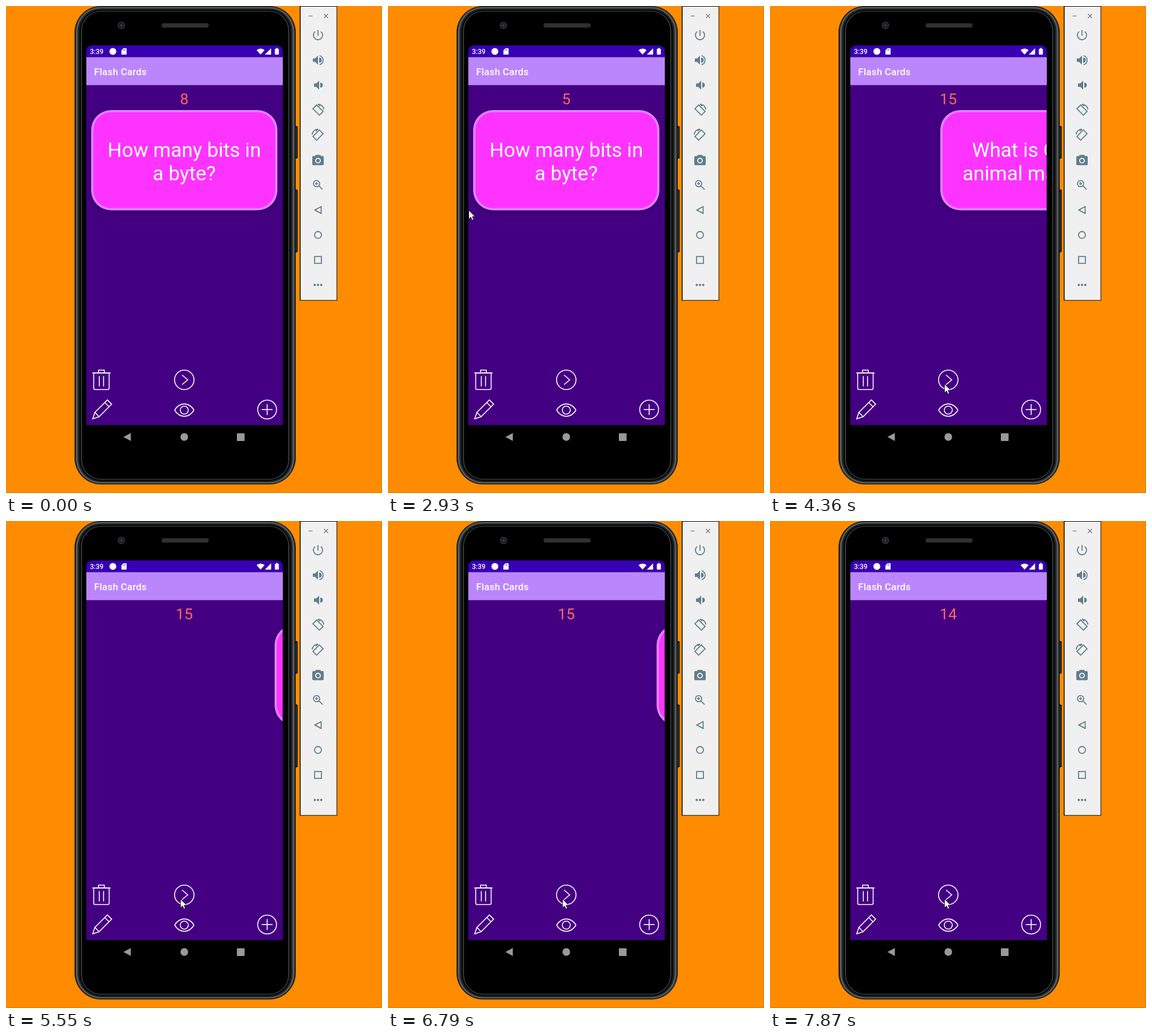
These frames come from a looping animation (658x852 px, 7990 ms). An HTML page with a canvas:

```html
<!DOCTYPE html>
<html lang="en">
<head>
<meta charset="utf-8">
<title>Flash Cards</title>
<style>
html, body { margin: 0; width: 100%; height: 100%; overflow: hidden; background: #ff8c00; }
canvas { display: block; }
</style>
</head>
<body>
<canvas id="stage" width="658" height="852"></canvas>
<script>
const ctx = document.getElementById('stage').getContext('2d');
const TAU = Math.PI * 2;
const LOOP = 7990;
const STEP = 132;
const SLIDE_STEP = 92;  // card travel per refresh

const stepsSince = (t, start) => Math.floor((t - start + 30) / STEP);

const deals = [
  { at: 4090, from: 333, count: 15 },
  { at: 5550, from: 321, count: 15 },
  { at: 6790, from: 321, count: 15 },
  { at: 7870, from: 400, count: 14 }
];
const POINTER_START = 1730;
const pointerPath = [
  { step: 0, x: 536, y: 839 },
  { step: 2, x: 373, y: 717 },
  { step: 6, x: 325, y: 688 },
  { step: 8, x: 451, y: 554 },
  { step: 9, x: 141, y: 357 },
  { step: 10, x: 240, y: 55 },
  { step: 13, x: 270, y: 772 },
  { step: 16, x: 305, y: 661 }
];

function pointerAt(t) {
  const step = stepsSince(t, POINTER_START);
  const next = pointerPath.findIndex(p => p.step > step);
  if (next < 0) return pointerPath.at(-1);
  const a = pointerPath[next - 1], b = pointerPath[next];
  const k = (step - a.step) / (b.step - a.step);
  return { x: a.x + (b.x - a.x) * k, y: a.y + (b.y - a.y) * k };
}

function stateAt(t) {
  const deal = deals.findLast(d => d.at <= t);
  if (!deal) {
    return { count: 8 - Math.floor((t + 573) / 1003), offset: 0, lines: ['How many bits in', 'a byte?'] };
  }
  return {
    count: deal.count - Math.floor((t - deal.at) / 920),
    offset: Math.max(0, deal.from - SLIDE_STEP * stepsSince(t, deal.at)),
    lines: ["What is OSU's", 'animal mascot?']
  };
}

function box(x, y, w, h, r, color) {
  ctx.beginPath();
  ctx.roundRect(x, y, w, h, r);
  ctx.fillStyle = color;
  ctx.fill();
}

function disc(x, y, r, color = ctx.fillStyle) {
  ctx.beginPath();
  ctx.arc(x, y, r, 0, TAU);
  ctx.fillStyle = color;
  ctx.fill();
}

function arc(x, y, r, from = 0, to = TAU) {
  ctx.beginPath();
  ctx.arc(x, y, r, from, to);
  ctx.stroke();
}

function trace(xy) {
  ctx.beginPath();
  for (let i = 0; i < xy.length; i += 2) ctx.lineTo(xy[i], xy[i + 1]);
}

function line(...xy) {
  trace(xy);
  ctx.stroke();
}

function outline(...xy) {
  trace(xy);
  ctx.closePath();
  ctx.stroke();
}

function solid(...xy) {
  trace(xy);
  ctx.fill();
}

function icon(x, y, color, width, paint) {
  ctx.save();
  ctx.translate(x, y);
  ctx.fillStyle = ctx.strokeStyle = color;
  ctx.lineWidth = width;
  paint();
  ctx.restore();
}

function text(str, x, y, font, color, align = 'left', spacing = 0) {
  ctx.font = font + ' Roboto, sans-serif';
  ctx.textAlign = align;
  ctx.letterSpacing = spacing + 'px';
  ctx.fillStyle = color;
  ctx.fillText(str, x, y);
}

function drawPhone() {
  for (const [y, h] of [[210, 57], [321, 110]]) {
    box(504, y, 6.5, h, 2, '#151515');
    box(507, y + 3, 1.5, h - 6, 0, '#3b3b3b');
  }

  // Metal rim, from the outer edge inwards.
  const rim = [[0, '#131516'], [2, '#54595c'], [5.5, '#202324'], [8.5, '#070808'], [11.5, '#43484a'], [13, '#000']];
  for (const [inset, color] of rim) {
    const top = inset * 0.75;
    box(120 + inset, top, 387 - 2 * inset, 837 - 2 * top, 46 - inset, color);
  }

  box(272, 30, 83, 8, 4, '#2b2929');
  box(274, 32, 79, 4, 2, '#343131');
  disc(202, 34, 6.5, '#303136');
  disc(202, 34, 4.5, '#17181f');
  disc(202, 34, 2.3, '#303b60');

  icon(212, 754, '#999', 1, () => solid(-6.5, 0, 6.5, -7, 6.5, 7));
  disc(312, 754, 6.7, '#999');
  box(404, 747.5, 13.5, 13.5, 1, '#999');
}

function speaker(x) {
  solid(x, -3, x + 4, -3, x + 9, -8, x + 9, 8, x + 4, 3, x, 3);
  ctx.beginPath();
  ctx.arc(x + 11, 0, 4.5, -TAU / 4, TAU / 4);
  ctx.fill();
}

function rotateIcon(side) {
  ctx.scale(side, 1);
  arc(0, 0, 10.3, -TAU / 4, -0.1);
  line(4, -7, 0, -10.3);
  ctx.rotate(TAU / 8);
  ctx.strokeRect(-8, -4.7, 16, 9.4);
}

const tools = [
  () => { arc(0, 0, 8, -0.9, Math.PI + 0.9); line(0, -9, 0, 1); },
  () => { speaker(-9); arc(1, 0, 8, -1.35, 1.35); },
  () => speaker(-7),
  () => rotateIcon(1),
  () => rotateIcon(-1),
  () => {
    box(-10, -7, 20, 16, 2, NEUTRAL);
    box(-5, -9, 10, 4, 2, NEUTRAL);
    disc(0, 1, 5, PANEL);
    disc(0, 1, 3.1, NEUTRAL);
  },
  () => { arc(-2.5, -2.5, 5.4); line(1.5, 1.5, 8, 8); line(-5, -2.5, 0, -2.5); line(-2.5, -5, -2.5, 0); },
  () => outline(-5.5, 0, 5.5, -6, 5.5, 6),
  () => arc(0, 0, 6.1),
  () => ctx.strokeRect(-6, -6, 12, 12),
  () => { for (const x of [-5.7, 0, 5.7]) disc(x, 0, 2); }
];
const NEUTRAL = '#607d8b';
const PANEL = '#f0f0f0';

function drawToolbar() {
  box(514, 0, 65.5, 515.5, 0, '#000');
  box(515.5, 1, 63, 513.5, 0, PANEL);
  icon(533, 17.5, '#777', 1.2, () => line(-3.5, 0, 3.5, 0));
  icon(560, 17.5, '#777', 1.3, () => { line(-3.5, -3.5, 3.5, 3.5); line(3.5, -3.5, -3.5, 3.5); });
  tools.forEach((paint, i) => icon(546, 51 + i * 43.7, NEUTRAL, 1.8, paint));
}

function drawBars() {
  box(140.5, 69, 344, 20.5, [10, 10, 0, 0], '#3700b3');
  text('3:39', 147, 84, '500 12px', '#fff');
  disc(187, 79.5, 6, '#fff');
  icon(202, 74, '#fff', 1, () => solid(3.5, 0, 9, 0, 9, 11, 0, 11, 0, 3.5));
  for (const x of [205.5, 207.2]) box(x, 76, 0.9, 2, 0, '#3700b3');
  icon(445.5, 85, '#fff', 1, () => {
    ctx.beginPath();
    ctx.moveTo(0, 0);
    ctx.arc(0, 0, 10.5, -TAU / 4 - 0.73, -TAU / 4 + 0.73);
    ctx.fill();
  });
  icon(464, 85, '#fff', 1, () => solid(0, 0, -11, 0, 0, -11));
  box(470.5, 75, 7, 10, 1, '#fff');
  box(472.5, 73.5, 3, 2, 0, '#fff');

  box(140.5, 89.5, 344, 49, 0, '#bb86fc');
  text('Flash Cards', 154.2, 121, '500 17px', '#fff', 'left', 0.2);
}

function trash() {
  line(-16, -12, 16, -12);
  line(-5, -12, -5, -17, 5, -17, 5, -12);
  ctx.beginPath();
  ctx.roundRect(-13.5, -12, 27, 29, [0, 0, 2.5, 2.5]);
  ctx.stroke();
  for (const x of [-3.7, 3.7]) line(x, -6.5, x, 11.5);
}

function pencil() {
  ctx.rotate(-TAU / 8);
  outline(-21.5, 0, -11, -5.3, 20, -5.3, 20, 5.3, -11, 5.3);
  for (const x of [-11, 13.5]) line(x, -5.3, x, 5.3);
}

function eye() {
  for (const side of [-1, 1]) {
    ctx.beginPath();
    ctx.moveTo(-17, 0);
    ctx.bezierCurveTo(-8, side * 14.5, 8, side * 14.5, 17, 0);
    ctx.stroke();
  }
  arc(0, 0, 7);
}

function drawButtons() {
  const add = (x, y, paint) => icon(x, y, '#fff', 1.6, paint);
  add(167, 654, trash);
  add(167, 707, pencil);
  add(312, 707, eye);
  add(312, 654, () => { arc(0, 0, 17); line(-4, -8.5, 6, 0, -4, 8.5); });
  add(457, 706, () => { arc(0, 0, 16.5); line(-9.5, 0, 9.5, 0); line(0, -9.5, 0, 9.5); });
}

function drawCard(offset, lines) {
  ctx.save();
  ctx.beginPath();
  ctx.rect(141, 139, 343, 594);
  ctx.clip();
  ctx.translate(offset, 0);
  ctx.shadowColor = 'rgba(0,0,0,.28)';
  ctx.shadowBlur = 7;
  ctx.shadowOffsetY = 3;
  box(149, 182, 326, 175.5, 35, '#df80ff');
  ctx.shadowColor = 'transparent';
  box(153, 186, 318, 167.5, 31, '#ff33ff');
  lines.forEach((str, i) => text(str, 312, 264 + i * 41, '400 35px', '#fff', 'center'));
  ctx.restore();
}

function drawPointer({ x, y }) {
  const arrow = [0.5, 0.5, 0.5, 15.5, 4, 12.3, 6.3, 17.5, 8.7, 16.5, 6.5, 11.3, 11, 11.3];
  icon(x, y, '#fff', 1, () => solid(...arrow));
  icon(x, y, '#111', 0.7, () => outline(...arrow));
}

function draw(t) {
  const { count, offset, lines } = stateAt(t);
  box(0, 0, 658, 852, 0, '#d97800');
  box(0, 0, 657, 851, 0, '#ff8c00');
  drawPhone();
  drawToolbar();
  box(140.5, 138.5, 344, 594.5, 0, '#440083');
  drawBars();
  text(count, 312, 171.5, '400 26.7px', '#ff6860', 'center');
  drawCard(offset, lines);
  drawButtons();
  if (t >= POINTER_START) drawPointer(pointerAt(t));
}

const start = performance.now();
function frame() {
  draw((performance.now() - start) % LOOP);
  requestAnimationFrame(frame);
}
frame();
</script>
</body>
</html>
```
